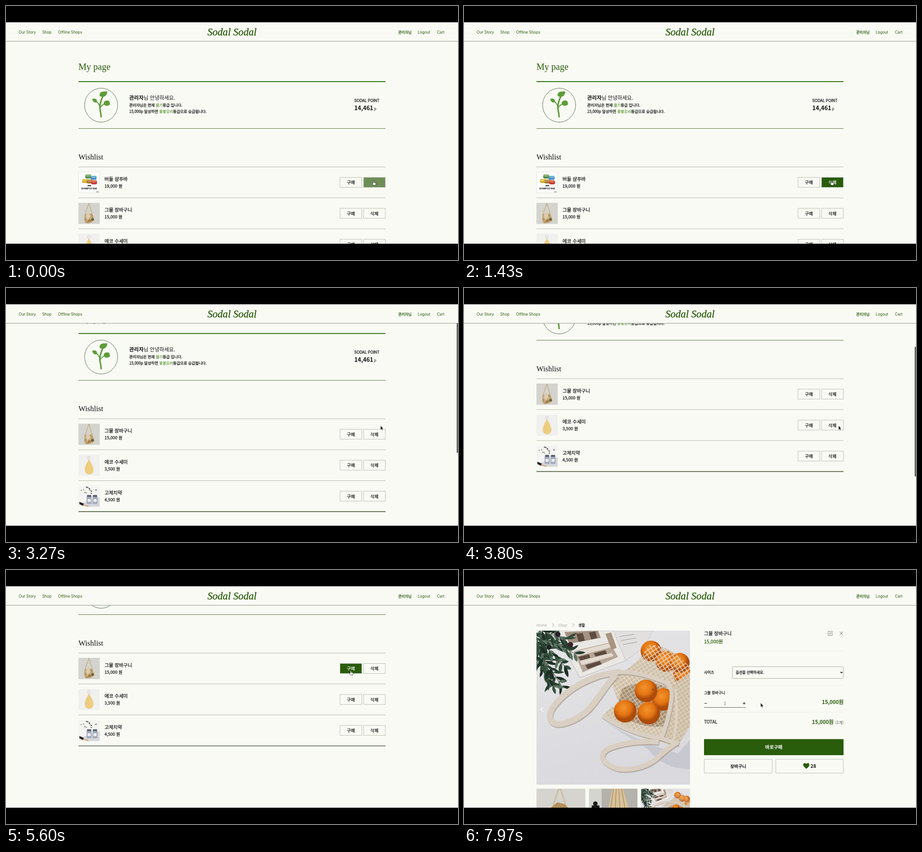
Animation of 998x561 px, one loop 8 s. Source, as an HTML page:

```html
<!DOCTYPE html>
<html lang="ko">
<head>
<meta charset="utf-8">
<title>My page</title>
<style>
  html, body { margin: 0; width: 100%; height: 100%; overflow: hidden; background: #000; }
  svg { display: block; width: 998px; height: 561px; }
  svg svg { width: auto; height: auto; }
  text { font-family: "Noto Sans CJK KR", "Noto Sans CJK", sans-serif; color: #111; white-space: pre; }
  text, tspan { fill: currentColor; }
  .latin { font-family: Inter, sans-serif; }
  .display { font-family: "Liberation Serif", serif; }
  .green { color: #295c0b; }
  .leaf { color: #5c9c38; }
  .box { fill: none; stroke: #b9bdb3; }
  .bold { font-weight: 700; }
  .medium, .medium tspan { stroke: currentColor; stroke-width: .25px; }
  .mid { text-anchor: middle; }
  .end { text-anchor: end; }
</style>
</head>
<body>
<svg id="stage" viewBox="0 0 998 561"></svg>
<script>
const LOOP = 8000, GREEN = '#295c0b', PAPER = '#f9faf4';
const REMOVED = 1800, NEXT_PAGE = 5930, PITCH = 68.4;
const stage = document.getElementById('stage');

const text = (x, y, size, str, cls = '', more = '') =>
  `<text x="${x}" y="${y}" font-size="${size}" class="${cls}" ${more}>${str}</text>`;
const rect = (x, y, w, h, fill, more = '') =>
  `<rect x="${x}" y="${y}" width="${w}" height="${h}" fill="${fill}" ${more}/>`;
const line = (x1, x2, y, color, width = 1) =>
  `<path d="M${x1} ${y}H${x2}" stroke="${color}" stroke-width="${width}"/>`;
const path = (d, fill, stroke = 'none', width = 1, more = '') =>
  `<path d="${d}" fill="${fill}" stroke="${stroke}" stroke-width="${width}" ${more}/>`;
const dot = (x, y, r, fill, ry = r) => `<ellipse cx="${x}" cy="${y}" rx="${r}" ry="${ry}" fill="${fill}"/>`;
const clip = (x, y, w, h, content) => `<svg x="${x}" y="${y}" style="width:${w}px;height:${h}px">${content}</svg>`;

function seeded(seed) {
  return () => (seed = (seed * 16807) % 2147483647) / 2147483647;
}

// ---- Wishlist page ----
const puck = (x, y, color, top) =>
  rect(x, y, 13, 9, color, 'rx="3"') + dot(x + 6.5, y + 2.5, 6, top, 2.5);

const bagShape = 'M14 24Q21 28 30 22L35 38Q30 46 17 45Q11 43 14 24Z';
const bag = path('M15 24L23 1L30 23', 'none', '#bba577', 1.2) +
  path(bagShape, '#b4945f') + path(bagShape, 'url(#net)', 'none', 1, 'opacity=".5"') +
  path('M16 28L22 18L27 30L20 38Z', '#dccdae') + dot(31, 37, 3, '#65613b') + dot(24, 40, 3, '#a87840');

function toothpaste() {
  const rnd = seeded(11);
  let out = rect(0, 0, 47, 47, '#f4f4f3') + path('M8 40Q26 28 47 26V47H20Z', '#d5d7dc');
  for (let i = 0; i < 13; i++) out += dot(6 + rnd() * 38, 3 + rnd() * 17, 1.4, i % 3 ? '#55564d' : '#a39e83');
  for (const x of [18, 31]) {
    out += rect(x, 23, 11, 18, '#a4abb8', 'rx="2"') + rect(x + 1, 21, 9, 4, '#565c69') + rect(x + 2, 30, 7, 6, '#eceef2');
  }
  return out + path('M2 36L12 40L10 45L2 41Z', '#292522') + path('M10 43L22 46', 'none', '#d19b6b', 2);
}

const items = [
  ['버들 샴푸바', '19,000', rect(.5, .5, 46, 46, '#fff', 'stroke="#e5e5d8"') +
    puck(8, 16, '#d5ad35', '#e8cb57') + puck(15, 6, '#588a4a', '#8bb877') + puck(27, 9, '#4c8fc0', '#73b5d8') +
    puck(18, 17, '#a97b39', '#c69a58') + puck(28, 19, '#c83f3a', '#e36c54') +
    rect(20, 30, 8, 2, '#222') + text(23.5, 39, 4.6, 'SHAMPOO BAR', 'latin bold mid') + rect(39, 44, 6, 1, '#555')],
  ['그물 장바구니', '15,000', rect(0, 0, 47, 47, '#d4d3cd') + bag],
  ['에코 수세미', '3,500', rect(0, 0, 47, 47, '#f0f0ee') +
    `<circle cx="23" cy="7" r="3" fill="none" stroke="#c7c9cc"/>` +
    path('M23 10C26 16 33 25 33 34C33 41 28 44 23.5 44C18 44 13.5 40 14 33C14 25 20 17 23 10Z', '#edcd80')],
  ['고체치약', '4,500', toothpaste()]
];

const button = (x, label) => `<g class="button">${rect(x, 378.5, 48, 22, GREEN, 'class="hover" opacity="0"')}
  <rect x="${x}" y="378.5" width="48" height="22" class="box"/>${text(x + 24, 393.3, 9.5, label, 'medium mid')}</g>`;

const row = ([name, price, picture], i) => `<g class="row">
  ${clip(160, 366, 47, 47, picture)}
  ${text(217.5, 386, 10.5, name, 'medium')}${text(217.5, 401, 9.3, price + ' 원', 'medium')}
  ${button(737.5, '구매')}${button(789.5, '삭제')}
  ${i < 3 ? line(160, 838, 423.7, '#b3b6ad') : line(160, 838, 423.7, '#505c40', 1.7)}</g>`;

const plant = `<ellipse cx="210" cy="219" rx="36.5" ry="37.5" fill="none" stroke="#45613a" stroke-width=".9"/>
  ${path('M210 246C210 235 206 228 207.5 219C209 209 212 203 215 197', 'none', '#5c9c38', 3.2)}
  ${path('M207 222Q204 212 196 209M208 225Q212 217 222 215', 'none', '#5c9c38', 2)}
  ${path('M207 199C205 189 214 188 224 189C222 199 217 203 207 199Z', '#5c9c38')}
  ${path('M190.5 205C197 203 203 206 200 213C194 214 191 210 190.5 205Z', '#5c9c38')}
  ${path('M216 217C214 209 223 207 228 210L230 217C225 222 219 221 216 217Z', '#5c9c38')}`;

const wishPage = `<g id="wish"><g id="scroller">
  ${text(160, 141, 20, 'My page', 'display green')}
  ${line(160, 838, 167, '#356f12', 2)}${plant}
  <text x="272" y="207" font-size="11.5"><tspan class="bold">관리자</tspan>님 안녕하세요.</text>
  <text x="272" y="222" font-size="8.4" class="medium">관리자님은 현재 <tspan class="leaf">줄기</tspan>등급 입니다.</text>
  <text x="272" y="236" font-size="8.4" class="medium">15,000p 달성하면 <tspan class="leaf">꽃봉오리</tspan>등급으로 승급됩니다.</text>
  ${text(769, 212, 8.3, 'SODAL POINT', 'latin medium')}
  ${text(769, 230, 12.8, '14,461', 'bold')}${text(812.5, 230, 8, 'p')}
  ${line(160, 838, 270.5, '#5a7040')}
  ${text(160, 339, 16.6, 'Wishlist', 'display')}
  ${line(160, 838, 355.4, '#aeb2a8')}
  ${items.map(row).join('')}</g></g>`;

// ---- Product page ----
function olive() {
  const rnd = seeded(5);
  const twigs = [[156, 142, 88, 42], [158, 165, 58, 92], [156, 190, 40, 66], [166, 132, 58, 22], [160, 150, 62, 62], [156, 140, 30, 80]];
  let out = '';
  for (const [x, y, dx, dy] of twigs) {
    out += path(`M${x} ${y}l${dx} ${dy}`, 'none', '#4d4c39', 1.2);
    const tilt = Math.atan2(dy, dx) * 180 / Math.PI;
    for (let k = 0; k <= 1; k += .11) for (const side of [-1, 1]) {
      const turn = tilt + side * (8 + rnd() * 55), len = 17 + rnd() * 14, wide = 5 + rnd() * 3;
      out += path(`M0 0Q${len / 2} ${-wide} ${len} 0Q${len / 2} ${wide} 0 0Z`,
        ['#1c2f25', '#26402f', '#364f3d', '#5c7362'][rnd() * 4 | 0], 'none', 1,
        `transform="translate(${x + dx * k} ${y + dy * k}) rotate(${turn})"`);
    }
  }
  return out + dot(207, 142, 6, '#2b2029') + dot(235, 165, 6, '#39232a') + dot(188, 171, 5, '#221f27');
}

const orange = (x, y, r) => dot(x, y, r, 'url(#orange)');
const strap = (d, width = 12) => path(d, 'none', '#a79b8d', width, 'stroke-linejoin="round" transform="translate(1.5 2.5)" opacity=".7"') +
  path(d, 'none', '#d9cfc2', width, 'stroke-linejoin="round"');
const sack = 'M322 240C355 225 378 208 392 190L410 165Q455 165 499 215V345L470 392L437 380C390 372 335 350 306 322L340 290Z';
const opening = 'M349 262Q395 238 445 258Q460 300 440 345Q390 352 335 315Z';
const netting = (d, opacity = 1) => path(d, 'url(#net)', 'none', 1, `opacity="${opacity}"`);

const photo = `<g id="photo" clip-path="url(#square)">
  ${rect(160, 134, 339, 340, 'url(#table)')}
  ${path('M199 134H330L357 200L256 238Z', '#eae8e4', '#b8b5b2')}
  ${path('M330 134H418L396 172L357 200Z', '#e2e0df', '#c6c4c2')}
  ${path('M222 137L296 134L302 150L232 163Z', '#a39182')}${path('M243 179L322 160L340 192L262 226Z', '#b7a697')}
  ${path('M246 180L320 162L324 171L251 190ZM256 201L326 183L330 190L260 210Z', '#e3dad0')}
  ${path('M252 192L276 186L279 194L257 200ZM286 184L312 177L316 185L291 191ZM268 210L300 201L304 208L273 219ZM248 141L262 139L267 156L253 159ZM276 138L290 136L294 150L281 153Z', '#5d4b40')}
  ${path('M312 141L325 138L337 172L326 176Z', '#a99480')}${path('M342 147l34 -5M346 156l34 -6M350 165l32 -6', 'none', '#b3adab', 1.5)}
  ${olive()}
  ${path('M310 335Q400 385 472 405L499 375V440Q440 440 405 395Z', '#adaeb8', 'none', 1, 'opacity=".4"')}
  ${path(sack, '#cdbfa9')}
  ${orange(413, 179, 23)}${orange(446, 202, 23)}${orange(484, 231, 22)}${orange(476, 205, 22)}
  ${netting(sack)}
  ${path(opening, '#a48d70')}${netting(opening, .7)}
  ${orange(440, 286, 25)}${orange(402, 267, 25)}${orange(356, 312, 25)}${orange(408, 316, 25)}
  ${path('M453 256Q468 300 442 372L476 382L499 340V225Q480 245 453 256Z', '#c9baa2')}
  ${netting('M453 256Q468 300 442 372L476 382L499 340V225Q480 245 453 256Z', .8)}
  ${dot(417, 264, 2, '#725019')}
  ${strap('M337 230C315 250 302 278 276 307C252 330 222 342 204 340C184 336 186 314 202 296C224 268 262 245 300 233L345 224', 13)}
  ${strap('M337 226Q385 222 446 249Q463 258 457 292Q451 335 434 376', 9)}
  ${strap('M306 322Q365 362 436 372L474 384', 9)}
  ${strap('M430 380C390 376 340 384 316 396C294 412 310 430 340 439C375 444 412 432 434 408Q455 390 470 381', 11)}
  ${path('M466 262Q474 320 463 375', 'none', '#ded3c3', 5)}</g>`;

const tiles = clip(160, 483, 108, 42, rect(0, 0, 108, 42, '#d5d4ce') +
    path('M36 42Q44 12 50 0M66 42Q59 18 53 0', 'none', '#cfbda4', 3) + path('M32 42L46 30L62 34L70 42Z', '#b3905c')) +
  clip(276, 483, 107, 42, rect(0, 0, 107, 42, '#b3b2ab') + rect(0, 0, 28, 42, '#d4d5cf') +
    path('M51 0H75L87 42H43Z', '#d7c29a') + path('M54 0L48 42M60 0L58 42M66 0L68 42M72 0L79 42', 'none', '#ac8f62', 1.5) +
    dot(14, 33, 5, '#191918') + rect(6, 37, 17, 5, '#191918')) +
  '<use href="#photo" transform="translate(340.03 440.3) scale(.3186)"/>';

const chevron = (x, y, color) => path(`M${x} ${y - 3.5}l4.5 3.5l-4.5 3.5`, 'none', color, .9);

const productPage = `<g id="product">
  ${text(160, 124.5, 8.2, 'Home', '', 'style="color:#a8aaa5"')}${chevron(194.5, 121.5, '#999')}
  ${text(208, 124.5, 8.2, 'Shop', '', 'style="color:#a8aaa5"')}${chevron(239, 121.5, '#999')}${text(252.5, 124.5, 8, '생활', 'medium')}
  ${photo}${path('M175 303l-5.5 5l5.5 5', 'none', '#fff', 1.5)}${tiles}
  ${text(530, 143.5, 10.5, '그물 장바구니', 'medium')}${text(530, 162, 10.5, '15,000원', 'green medium')}
  ${path('M809 135.5h-5v9h9v-5M807 141.5l.5 -2.5l4.5 -4.5l2 2l-4.5 4.5Z', 'none', '#70756d', .9)}
  ${path('M829.5 136l7 8M836.5 136l-7 8', 'none', '#70756d', 1)}
  ${line(530, 838, 179, '#eeeee8')}${line(530, 838, 255, '#eeeee8')}${line(530, 838, 314, '#eeeee8')}
  ${text(530, 229.3, 8, '사이즈', 'medium')}
  <rect x="592.5" y="213.5" width="245" height="26" rx="2" fill="${PAPER}" stroke="#a9aea5"/>
  ${text(600, 229.3, 7.9, '옵션을 선택하세요.', 'medium')}${path('M831 225l2.5 2.5l2.5 -2.5', 'none', '#111', 1.3)}
  ${text(530, 273.5, 8, '그물 장바구니', 'medium')}
  ${path('M531 294.5h5.5M615.5 294.5h6M618.5 291.5v6', 'none', '#111', 1)}${text(576, 297.5, 8.4, '1', 'mid', 'style="color:#555"')}
  ${line(530, 622, 303.5, '#5f645c')}
  ${text(838, 295.7, 11.4, '15,000원', 'green bold end')}
  ${text(530, 338.5, 9.8, 'TOTAL', 'medium')}${text(816, 340, 11.4, '15,000원', 'green bold end')}
  ${text(838, 339.5, 8.4, '(1개)', 'end', 'style="color:#4b5147"')}
  ${rect(530, 373.5, 308, 35.5, GREEN)}${text(684, 395.3, 10.4, '바로구매', 'bold mid', 'style="color:#fff"')}
  <path class="box" d="M530.5 418H680.5V448.5H530.5ZM688.5 418H837.5V448.5H688.5Z"/>
  ${text(605.5, 437, 9.5, '장바구니', 'bold mid')}
  ${path('M756 439C751 435 749 433 749 430.5C749 426 754 425.5 756 428.5C758 425.5 762.5 426 762.5 430.5C762.5 433 761 435 756 439Z', GREEN)}
  ${text(765, 437.3, 10.5, '28', 'bold')}
  <g id="status">${rect(0, 518, 331, 7, '#dfe1dc')}
    ${text(1, 526, 7.4, 'sodalsodal-backend.shop의 응답을 기다리는 중', '', 'style="color:#8b8e88"')}</g></g>`;

const nav = [[28, 'Our Story'], [80, 'Shop'], [115, 'Offline Shops'], [909, 'Logout'], [951.5, 'Cart']];
const header = rect(0, 36, 998, 42, PAPER) + line(0, 998, 78, '#8b9087') +
  nav.map(([x, label]) => text(x, 60.5, 8.4, label, 'latin green')).join('') +
  text(866, 60.5, 8, '관리자님', 'green medium') +
  text(499, 64.5, 22.6, 'Sodal Sodal', 'display green mid', 'font-style="italic" stroke="#295c0b" stroke-width=".35"');

stage.innerHTML = `<defs>
  <clipPath id="view"><rect y="36" width="998" height="489"/></clipPath>
  <clipPath id="square"><rect x="160" y="134" width="339" height="340"/></clipPath>
  <linearGradient id="table" x2=".3" y2="1"><stop stop-color="#e6e6e7"/><stop offset="1" stop-color="#d9d9de"/></linearGradient>
  <radialGradient id="orange" cx=".42" cy=".35"><stop stop-color="#f2942c"/><stop offset=".65" stop-color="#e37412"/><stop offset="1" stop-color="#ad4b0b"/></radialGradient>
  <pattern id="net" width="11" height="11" patternUnits="userSpaceOnUse" patternTransform="rotate(12)">
    <path d="M0 5.5L5.5 0L11 5.5L5.5 11Z" fill="none" stroke="#e6dac7" stroke-width="1.6"/></pattern></defs>
  ${rect(0, 0, 998, 561, '#000')}
  <g clip-path="url(#view)">${rect(0, 36, 998, 489, PAPER)}${wishPage}${productPage}${header}
    <rect id="bar" x="995" width="3" rx="1.5" fill="#666"/>
    <g id="arrow"><path d="M0 0V9.2L2.1 7.4L3.5 10.5L5 9.8L3.6 6.8H6.2Z" fill="#111" stroke="#fff" stroke-width=".5"/></g>
    <g id="hand"><path d="M0 0Q1.5 -1 1.8 1V4Q6 3.5 5.8 7L4.8 10H.2L-2.6 6.2Q-2.5 4.7 -.5 6Z" fill="#fff" stroke="#222" stroke-width=".8"/></g>
  </g>`;

// ---- Motion: rows of [ms, values...] ----
const scrollSteps = [[2850, 0], [3050, 22], [3270, 66.3], [3400, 98], [3650, 140], [3900, 165], [4150, 172]];
const cursorSteps = [[1780, 811, 386], [2000, 818, 352], [2250, 827, 304], [4130, 827, 304],
  [4330, 770, 320], [4530, 726, 315.5], [4800, 738, 262], [5150, 760.5, 222], [7000, 760.5, 222],
  [7300, 714, 255], [7800, 655, 293.5]];
const listBarSteps = [[2830, 0], [2900, 1], [4950, 1], [5200, 0]];
const pageBarSteps = [[6850, 1], [7100, 0]];
const statusSteps = [[6330, 1], [6500, 0]];
const deleteHover = [[-200, 0], [100, 1]];
const buyHover = [[4950, 0], [5250, 1]];

function at(steps, t) {
  const next = steps.findIndex(s => s[0] > t);
  if (next === 0) return steps[0].slice(1);
  if (next < 0) return steps[steps.length - 1].slice(1);
  const a = steps[next - 1], b = steps[next], k = (t - a[0]) / (b[0] - a[0]);
  return a.slice(1).map((v, i) => v + (b[i + 1] - v) * k);
}

const $ = id => document.getElementById(id);
const show = (el, on) => el.setAttribute('visibility', on ? 'visible' : 'hidden');
const set = (el, name, value) => el.setAttribute(name, value);
const rows = [...document.querySelectorAll('.row')];

function hover(rowIndex, buttonIndex, level) {
  const el = rows[rowIndex].querySelectorAll('.button')[buttonIndex];
  const label = el.querySelector('text');
  set(el.querySelector('.hover'), 'opacity', level);
  label.style.color = level < .7 ? '#111' : '#fff';
  label.style.opacity = level < .7 ? Math.max(0, 1 - 1.6 * level) : (level - .7) / .3;
}

function draw(t) {
  const onList = t < NEXT_PAGE, removed = t >= REMOVED;
  $('wish').style.display = onList ? '' : 'none';
  $('product').style.display = onList ? 'none' : '';

  const [scroll] = at(scrollSteps, t);
  set($('scroller'), 'transform', `translate(0 ${-scroll})`);
  rows.forEach((el, i) => set(el, 'transform', `translate(0 ${(i - removed) * PITCH})`));
  show(rows[0], !removed);
  hover(0, 1, at(deleteHover, t)[0]);
  hover(1, 0, at(buyHover, t)[0]);

  const bar = $('bar');
  set(bar, 'y', onList ? 38 + scroll * .59 : 38);
  set(bar, 'height', onList ? 287 : 57);
  set(bar, 'opacity', at(onList ? listBarSteps : pageBarSteps, t)[0]);
  set($('status'), 'opacity', .25 + .75 * at(statusSteps, t)[0]);
  show($('status'), !onList && t < 6750);

  const [x, y] = at(cursorSteps, t);
  const pointing = t < 1850 || (t > 4960 && onList);
  for (const id of ['arrow', 'hand']) set($(id), 'transform', `translate(${x} ${y})`);
  show($('hand'), pointing);
  show($('arrow'), !pointing);
}

const start = performance.now();
function tick(now) {
  draw(Math.max(0, now - start) % LOOP);
  requestAnimationFrame(tick);
}
draw(0);
requestAnimationFrame(tick);
</script>
</body>
</html>
```
